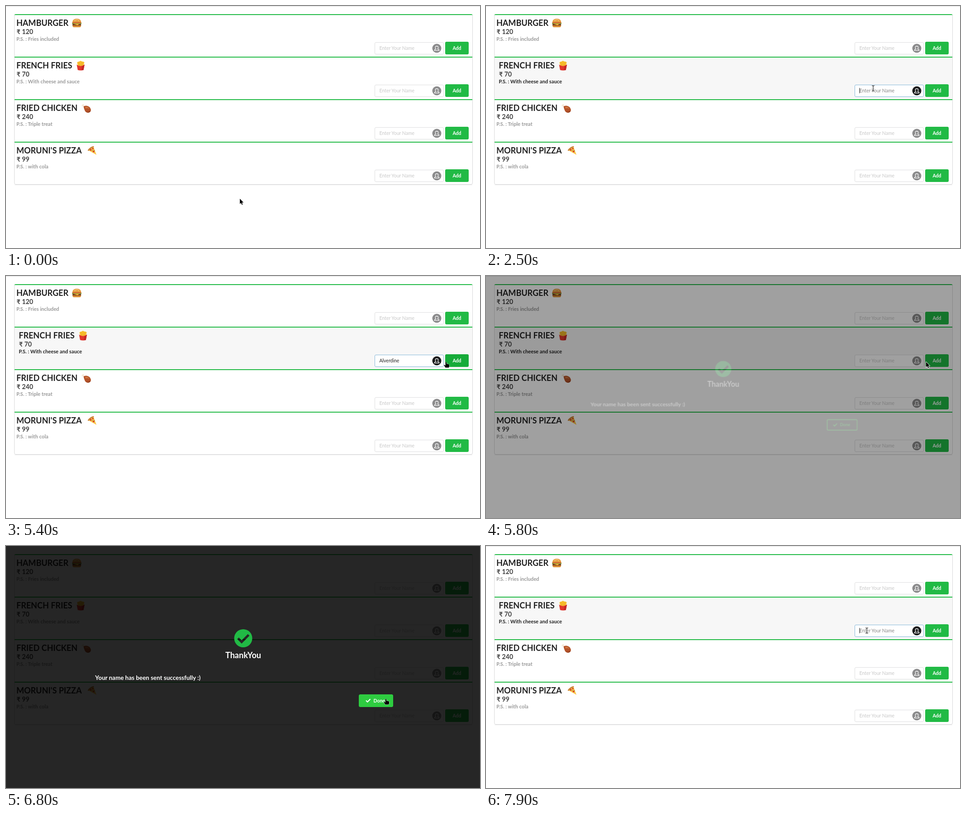
An HTML page that plays this animation: 1048 by 535 pixels, repeating every 8 s.

```html
<!DOCTYPE html>
<html lang="en">
<head>
<meta charset="utf-8">
<title>Menu</title>
<style>
  html, body { margin: 0; width: 100%; height: 100%; overflow: hidden; background: #fff; }
  svg { display: block; width: 100%; height: 100%; }
  text { font-family: Lato, "Open Sans", sans-serif; font-size: 10.5px; white-space: pre; }
  .title, .price, .note, .label { font-weight: 700; }
  .title { font-size: 18px; fill: #212121; }
  .price { font-size: 14.2px; fill: #404040; }
  .note { font-size: 11.2px; fill: #999; }
  .label { fill: #fff; }
  .bg { fill: #fff; }
  .info { transform: translateX(0); }
  .row.on .bg { fill: #f7f7f7; }
  .row.on .info { transform: translateX(var(--slide)); }
  .row.on .note { fill: #212121; }

  .row { --focus: 0%; --press: 0%; }
  .field { fill: #fff; stroke: color-mix(in srgb, #dededf, #85b7d9 var(--focus)); }
  .hint { fill: color-mix(in srgb, #c8c8c8, #878787 var(--focus)); }
  .user { opacity: calc(.5 + var(--f, 0) / 2); }
  .add { fill: color-mix(in srgb, #21ba45, #16ab39 var(--press)); }
  .typed { fill: #212121; }

  #modal { transform-origin: 524.5px 219px; }
  #modal .title { fill: #fff; text-anchor: middle; }
  #modal .message { font-size: 13.44px; font-weight: 700; fill: #fff; }
  #done { --fill: 0; }
  #done .box { fill: #2ecc40; fill-opacity: var(--fill); stroke: #2ecc40; stroke-width: 2; }
  #done .label { fill: color-mix(in srgb, #2ecc40, #fff calc(var(--fill) * 100%)); }
  #done .tick { stroke: color-mix(in srgb, #2ecc40, #fff calc(var(--fill) * 100%)); }
  .tick { fill: none; }
  #pointer path { stroke-linejoin: round; }
</style>
</head>
<body>
<svg id="stage" viewBox="0 0 1048 535" xmlns="http://www.w3.org/2000/svg">
  <defs>
    <clipPath id="card"><rect x="18" y="18" width="1014" height="377" rx="4"/></clipPath>
    <mask id="cut">
      <circle cx="524.5" cy="204" r="20" fill="#fff"/>
      <path class="tick" d="M513 204 l8 8 l15.5 -15.5" stroke="#000" stroke-width="5.2"/>
    </mask>

    <g id="burger">
      <path d="M.5 9 Q1 0 10.5 0 Q20 0 20.5 9 Z" fill="#e29a3f"/>
      <path d="M3 5 Q6 1 11 1.2 Q16 1.5 17 4 Q10 1.8 3 5 Z" fill="#f3bd6b"/>
      <path d="M6 4.2 h1.4 M10 2.8 h1.4 M14 4.6 h1.4" stroke="#fff0c8" stroke-width="1"/>
      <path d="M0 9 h21 v2 q-2 2 -4 .3 q-2 2 -4.2 .3 q-2 2 -4.2 .3 q-2 2 -4.2 .2 q-2.5 1.2 -4.4 -1 Z" fill="#79a637"/>
      <rect x="1" y="8.4" width="19" height="1.6" rx=".8" fill="#d6412b"/>
      <rect x=".8" y="11.8" width="19.4" height="3.4" rx="1.6" fill="#75391c"/>
      <path d="M3 11.2 h14 l-5 3 Z" fill="#fbc437"/>
      <path d="M1 15 h19 q0 4 -3.5 4 h-12 q-3.5 0 -3.5 -4 Z" fill="#d98c36"/>
    </g>

    <g id="fries">
      <path d="M1 3 l3 -1.5 l2 0 l1 -1.5 h3.5 l1 1.2 h2.5 l3.3 1.6 l-2 9 h-12 Z" fill="#fbc531"/>
      <path d="M4 2 l1.4 9 M7 1 l.5 10 M10.7 1 l-.4 10 M14 2 l-1.5 9" stroke="#e59a1c" stroke-width=".8"/>
      <path d="M.3 8 Q9 14.5 17.7 8 L15.4 20 Q9 22 2.6 20 Z" fill="#e2382f"/>
      <path d="M12 11.6 L17.7 8 L15.4 20 L11 20.8 Z" fill="#c62828"/>
    </g>

    <g id="leg">
      <path d="M3 4 L9 9" stroke="#f1e3d0" stroke-width="2.4"/>
      <circle cx="1.9" cy="4" r="1.7" fill="#f6eadb"/>
      <circle cx="3.7" cy="2.4" r="1.7" fill="#f6eadb"/>
      <path d="M4.5 6.5 Q6 4 11 4.6 Q19 6 20.6 12.5 Q21.5 18 16.5 19.6 Q10 21 7.4 15.5 Q5 10 4.5 6.5 Z" fill="#b4532a"/>
      <path d="M8 7 Q14 6 17.5 11 Q13 9 9 10.5 Z" fill="#d37a43"/>
      <path d="M10 17 Q15 20 19.5 15 Q19 19.5 15 19.6 Q11.5 19.6 10 17 Z" fill="#8d3b1c"/>
    </g>

    <g id="slice">
      <path d="M2 9.5 Q7 3.5 13.5 2 L20 19.5 Z" fill="#fbc64a"/>
      <path d="M.6 9.6 Q5 2 13.2 .3 Q15 .6 14.4 2.4 Q7.5 4.6 3 10.6 Q1 11.4 .6 9.6 Z" fill="#c9853b"/>
      <circle cx="7.2" cy="8.6" r="2" fill="#d2402c"/>
      <circle cx="12" cy="5.8" r="1.8" fill="#d2402c"/>
      <circle cx="13.6" cy="12" r="2" fill="#d2402c"/>
      <path d="M10 10 l1.6 -.8 M15.4 9 l.8 1.4" stroke="#6d9a35" stroke-width="1.2"/>
    </g>
  </defs>

  <rect width="1048" height="535" fill="#fff"/>
  <rect width="1048" height="1" fill="#dcdcdc"/>
  <rect x="19" y="395" width="1012" height="1" fill="#222426" opacity=".1"/>
  <g id="rows" clip-path="url(#card)"></g>
  <path d="M18.5 20 V391 a3.5 3.5 0 0 0 3.5 3.5 H1028 a3.5 3.5 0 0 0 3.5 -3.5 V20" fill="none" stroke="#d8d8d9"/>

  <g id="dimmer">
    <rect width="1048" height="535" opacity=".85"/>
    <g id="modal">
      <rect x="504" y="184" width="41" height="40" fill="#21ba45" mask="url(#cut)"/>
      <text class="title" x="524.5" y="248">ThankYou</text>
      <text class="message" x="197" y="296">Your name has been sent successfully :)</text>
      <g id="done">
        <rect class="box" x="781" y="329" width="74" height="26" rx="2.5"/>
        <path class="tick" d="M796 341.5 l3.2 3.2 l6.3 -6.3" stroke-width="2.2"/>
        <text class="label" x="812.5" y="345.5">Done</text>
      </g>
    </g>
  </g>

  <g id="pointer">
    <path id="arrow" d="M0 0 V11.6 L2.6 9.2 L4.6 13.6 L6.4 12.8 L4.5 8.5 H8.2 Z"
      stroke="#fff" stroke-width="1.6" paint-order="stroke"/>
    <path id="hand" d="M-1.2 1 q1.2 -2 2.4 0 V4.4 q1.4 -.8 2.2 .3 q1.4 -.6 2.1 .6 q1.5 -.3 1.6 1.4 V9 q-.2 2 -1.2 3.6 H-1.4 Q-3 10 -4.6 7.6 q.4 -2 2.4 -.4 l1 .8 Z"
      stroke="#fff" stroke-width="1" paint-order="stroke"/>
    <g id="beam" fill="none">
      <path d="M-3 -6 H-1.5 L0 -5 L1.5 -6 H3 M0 -5 V5 M-3 6 H-1.5 L0 5 L1.5 6 H3" stroke="#fff" stroke-width="2.6"/>
      <path d="M-3 -6 H-1.5 L0 -5 L1.5 -6 H3 M0 -5 V5 M-3 6 H-1.5 L0 5 L1.5 6 H3" stroke="#222" stroke-width="1.2"/>
    </g>
  </g>
</svg>

<script>
const LOOP = 8000, PITCH = 94;
const $ = id => document.getElementById(id);

const MENU = [
  { title: "HAMBURGER", price: 120, note: "Fries included", art: "burger", x: 146, y: 28 },
  { title: "FRENCH FRIES", price: 70, note: "With cheese and sauce", art: "fries", x: 156, y: 27.5 },
  { title: "FRIED CHICKEN", price: 240, note: "Triple treat", art: "leg", x: 167, y: 28 },
  { title: "MORUNI'S PIZZA", price: 99, note: "with cola", art: "slice", x: 180, y: 27.5 }
];

$("rows").innerHTML = MENU.map((m, i) => `
  <g class="row" transform="translate(0 ${i * PITCH})">
    <rect class="bg" x="18" y="18" width="1014" height="95"/>
    <rect x="18" y="18" width="1014" height="2" fill="#21ba45"/>
    <g class="info">
      <text class="title" x="23" y="44">${m.title}</text>
      <use href="#${m.art}" x="${m.x}" y="${m.y}"/>
      <text class="price" x="23.5" y="62">₹</text>
      <text class="price" x="35.3" y="62">${m.price}</text>
      <text class="note" x="23" y="77">P.S. : ${m.note}</text>
    </g>
    <rect class="field" x="815.5" y="80.5" width="152" height="26" rx="2.5"/>
    <text class="hint" x="825.5" y="97">Enter Your Name</text>
    <text class="typed" x="825.5" y="97"></text>
    <rect class="caret" x="825.5" y="87" width="1" height="12" fill="#222" visibility="hidden"/>
    <g class="user">
      <circle cx="952.5" cy="93.5" r="10" fill="#1b1c1d"/>
      <path d="M950.6 95 q-1.6 -1.4 -1.4 -3.4 q.4 -3 3.3 -3 q2.9 0 3.3 3 q.2 2 -1.4 3.4 q3 .4 3.3 3.4 h-10.4 q.3 -3 3.3 -3.4 Z"
        fill="none" stroke="#fff" stroke-width="1.1"/>
    </g>
    <rect class="add" x="971" y="79" width="52" height="28" rx="3"/>
    <text class="label" x="997" y="97" text-anchor="middle">Add</text>
  </g>`).join("");

const rows = [...document.querySelectorAll(".row")];
const form = rows[1];
const part = name => form.querySelector("." + name);
const hint = part("hint"), typed = part("typed"), caret = part("caret");

// Pointer travel in 100 ms ticks from one spot to another
function glide(start, end, [x0, y0], [x1, y1]) {
  const n = (end - start) / 100 + 1;
  return Array.from({ length: n }, (_, i) => {
    const k = (i + 1) / n, e = k * k * (3 - 2 * k);
    return [start + i * 100, { x: x0 + (x1 - x0) * e, y: y0 + (y1 - y0) * e }];
  });
}

const NAME = "Alverdine";
const type = (time, count) => [time, { text: NAME.slice(0, count), caret: true }];

// Each step holds until the next one
const STEPS = [
  [0, { x: 517, y: 426, live: true, slide: 5.25, focus: 0, press: 0, text: "", caret: false,
        dim: 0, fade: 0, scale: 1, fill: 0 }],
  ...glide(500, 1300, [517, 426], [846, 70]),
  ...glide(1400, 2100, [846, 70], [856, 182]),
  [2400, { focus: .5, caret: true }],
  [2500, { focus: 1 }],
  type(2900, 1), type(3100, 2), type(3200, 4), type(3300, 5), type(3700, 7), type(3900, 9),
  [4600, { x: 957, y: 194, caret: false }],
  [4800, { x: 968, y: 192 }],
  [5000, { x: 973, y: 190, press: .5, caret: true }],
  [5100, { press: 1 }],
  [5400, { caret: false }],
  [5800, { text: "", focus: 0, press: 0, dim: .44, fade: .44, scale: .896 }],
  [6100, { x: 882, y: 274, live: false, dim: .965, fade: 1, scale: 1 }],
  [6300, { x: 866, y: 304, dim: 1 }],
  [6400, { x: 849, y: 344 }],
  [6600, { x: 846, y: 342, fill: .5 }],
  [6700, { x: 843, y: 340, fill: 1 }],
  [6800, { x: 840, y: 338 }],
  [7000, { x: 824, y: 323, dim: .365, fade: .42, scale: .943 }],
  [7200, { y: 327, live: true, dim: 0, fade: 0, fill: 0 }],
  [7400, { x: 838, y: 176, slide: 2.5 }],
  [7600, { x: 842, y: 187, slide: 5.25 }],
  [7800, { focus: .5, caret: true }],
  [7900, { focus: 1 }]
];

const stateAt = t => Object.assign({}, ...STEPS.filter(s => s[0] <= t).map(s => s[1]));
const within = (v, a, b) => v >= a && v <= b;

function pointerKind(s, row) {
  if (s.dim) return within(s.x, 765, 856) && within(s.y, 322, 356) ? "hand" : "arrow";
  const y = s.y - row * PITCH;
  if (!rows[row] || !within(y, 79, 107)) return "arrow";
  if (within(s.x, 815, 968)) return "beam";
  return within(s.x, 971, 1023) ? "hand" : "arrow";
}

function draw(t) {
  const s = stateAt(t);
  const row = Math.floor((s.y - 18) / PITCH);
  rows.forEach((r, i) => r.classList.toggle("on", s.live && i === row));
  $("rows").style.setProperty("--slide", s.slide + "px");

  form.style.setProperty("--focus", s.focus * 100 + "%");
  form.style.setProperty("--f", s.focus);
  form.style.setProperty("--press", s.press * 100 + "%");
  hint.style.visibility = s.text ? "hidden" : "visible";
  typed.textContent = s.text;
  caret.setAttribute("x", 825.5 + (s.text ? typed.getComputedTextLength() : 0));
  caret.setAttribute("visibility", s.caret ? "visible" : "hidden");

  $("dimmer").style.opacity = s.dim;
  $("modal").style.opacity = s.fade;
  $("modal").style.transform = `scale(${s.scale})`;
  $("done").style.setProperty("--fill", s.fill);

  const kind = pointerKind(s, row);
  for (const id of ["arrow", "hand", "beam"]) $(id).style.display = id === kind ? "" : "none";
  $("pointer").setAttribute("transform", `translate(${s.x} ${s.y})`);
}

const begin = performance.now();
function tick() {
  draw((performance.now() - begin) % LOOP);
  requestAnimationFrame(tick);
}
tick();
</script>
</body>
</html>
```
